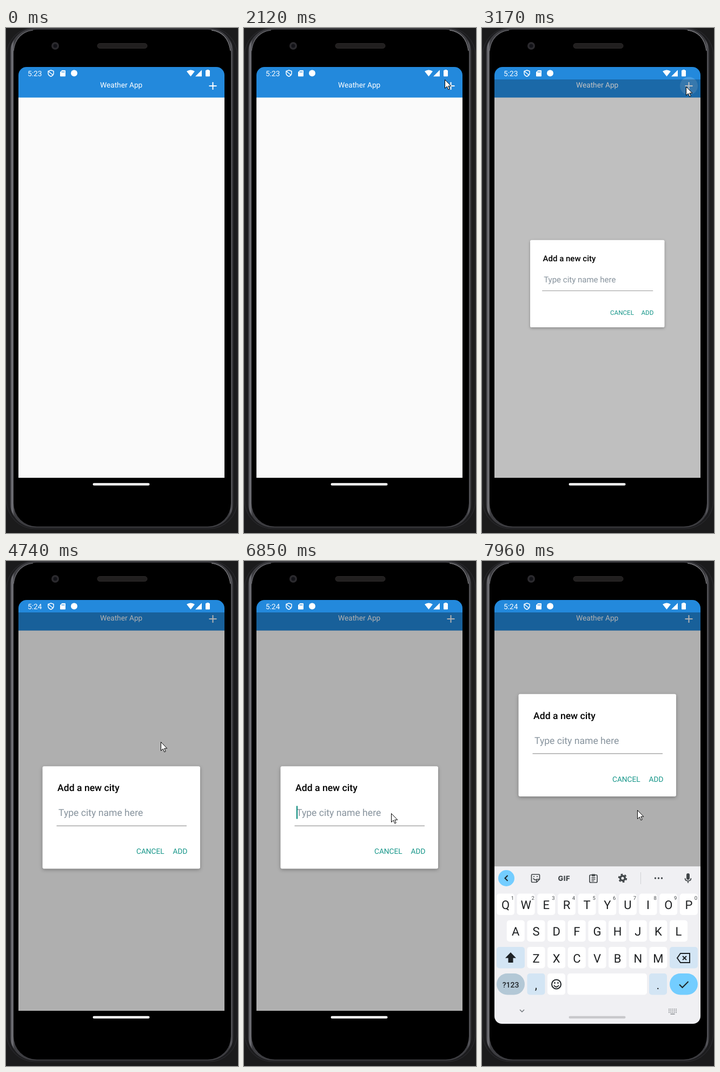
An HTML page that plays this animation: 429x933 px, repeating every 8 s.

```html
<!DOCTYPE html>
<html lang="en">
<head>
<meta charset="utf-8">
<title>Weather App</title>
<style>
  html, body { margin: 0; width: 100%; height: 100%; overflow: hidden; background: #1b1b1c; }
  svg { display: block; width: 429px; height: 933px; font-family: Roboto, sans-serif; text-rendering: geometricPrecision; }
  .card { fill: #fff; filter: drop-shadow(0 2px 3px rgba(0, 0, 0, .3)); }
  .line { fill: none; stroke: #1d2226; stroke-width: 2; }
  .key { font-size: 22px; fill: #1d1f21; text-anchor: middle; }
  .hint { font-size: 9.5px; fill: #45494d; text-anchor: middle; }
</style>
</head>
<body>
<svg viewBox="0 0 429 933">
  <defs>
    <linearGradient id="rim" x2="1" y2="0">
      <stop offset="0" stop-color="#2c2c30"/><stop offset=".009" stop-color="#77777d"/>
      <stop offset=".02" stop-color="#3c3c40"/><stop offset=".98" stop-color="#3c3c40"/>
      <stop offset=".99" stop-color="#58585d"/><stop offset="1" stop-color="#2a2a2d"/>
    </linearGradient>
    <clipPath id="glass"><rect x="23" y="72" width="381" height="783" rx="14"/></clipPath>
  </defs>

  <!-- phone body -->
  <rect width="429" height="933" fill="#1b1b1c"/>
  <rect x="1" y="-1" width="427" height="926" rx="52" fill="#1c1c1e" stroke="#2e2e32"/>
  <rect x="7.500" y="0" width="413" height="923" rx="46" fill="url(#rim)"/>
  <rect x="14" y="3" width="402" height="918" rx="43" fill="#000"/>
  <path d="M380 4Q410 8 415 42" fill="none" stroke="#a4a4a8"/>
  <path d="M14 42Q18 8 50 4" fill="none" stroke="#77777c"/>
  <circle cx="91" cy="33" r="7" fill="#2b2a2e"/><circle cx="91" cy="33" r="3.500" fill="#121217"/>
  <rect x="169" y="28.500" width="92" height="9" rx="4.500" fill="#211f1f" stroke="#2d2a2a"/>

  <!-- app -->
  <rect x="23" y="110" width="381" height="721" fill="#fafafa"/>
  <path d="M23 128.500V87A15 15 0 0 1 38 72H389A15 15 0 0 1 404 87V128.500Z" fill="#2389dc"/>
  <g fill="#fff">
    <text id="clock" x="40" y="88.500" font-size="13.700"></text>
    <path d="M83 78L88 79.800V83.500Q88 87.500 83 89.500Q78 87.500 78 83.500V79.800ZM79 80.500L87 87" fill="none" stroke="#fff" stroke-width="1.500"/>
    <path d="M103.500 78H109Q110 78 110 79V88.500Q110 89.500 109 89.500H101Q100 89.500 100 88.500V81.500Z"/>
    <path d="M103.500 80V82.500M105.500 80V82.500M107.500 80V82.500" stroke="#2389dc"/>
    <circle cx="126" cy="83.500" r="6"/>
    <path d="M334 80Q341.500 75 349 80L341.500 89.500ZM350 89.500L362 77.500V89.500Z"/>
    <path d="M371 78V77H375V78H376Q377 78 377 79V88.500Q377 89.500 376 89.500H370Q369 89.500 369 88.500V79Q369 78 370 78Z"/>
    <text x="174" y="109.500" font-size="13.700">Weather App</text>
    <circle id="ripple" cx="382.500" cy="107" r="16.500"/>
    <path d="M375.500 107H389.500M382.500 100V114" stroke="#fff" stroke-width="2"/>
  </g>
  <rect id="dim" x="23" y="95" width="381"/>

  <g id="dialog">
    <rect class="card" x="67.500" y="379.200" width="291.500" height="189.300" rx="3"/>
    <text x="95" y="425" font-size="17.600" font-weight="500">Add a new city</text>
    <text x="97" y="471.300" font-size="17.600" fill="#87939d">Type city name here</text>
    <path d="M93.500 489.300H334" stroke="#999" stroke-width="1.200"/>
    <rect id="caret" x="97" y="452.500" width="2" height="24" fill="#008577"/>
    <g font-size="13.700" fill="#169689">
      <text x="241" y="541.200">CANCEL</text><text x="308.500" y="541.200">ADD</text>
    </g>
  </g>

  <g clip-path="url(#glass)">
    <g id="keyboard">
      <rect x="23" y="564.500" width="381" height="291" fill="#f0f0f3"/>
      <g id="keys"></g>
      <circle cx="45" cy="586" r="15" fill="#73cdff"/>
      <path class="line" d="M47.500 581L42.500 586L47.500 591"/>
      <!-- toolbar icons -->
      <g class="line" style="stroke:#414649;stroke-width:1.700">
        <path d="M93 579H105Q106.500 579 106.500 580.500V588L101 593.500H93Q91.500 593.500 91.500 592V580.500Q91.500 579 93 579ZM101 593V588H106M95 586Q96.500 590 100 589M96 582V584M102 582V584"/>
        <path d="M201 580H211Q213 580 213 582V592Q213 594 211 594H201Q199 594 199 592V582Q199 580 201 580ZM202.500 585H209.500M202.500 588H209.500M202.500 591H207.500"/>
        <path d="M203 580.500H209" stroke-width="4"/>
        <circle cx="260" cy="586" r="4.300" stroke-width="3.500"/>
        <circle cx="260" cy="586" r="7" stroke-width="2.500" stroke-dasharray="3.665"/>
        <path d="M375.500 586Q375.500 591 381 591T386.500 586M381 591V595"/>
      </g>
      <text x="140.500" y="591" font-family="Inter, sans-serif" font-size="13" font-weight="800" letter-spacing=".5" fill="#414649">GIF</text>
      <path d="M293.500 575V597" stroke="#cfd1d4"/>
      <g fill="#414649">
        <circle cx="320.500" cy="586" r="1.700"/><circle cx="326.500" cy="586" r="1.700"/><circle cx="332.500" cy="586" r="1.700"/>
        <rect x="378" y="577" width="6" height="12" rx="3"/>
      </g>
      <!-- key icons -->
      <path d="M53 723L63 733.500H57.500V742H48.500V733.500H43Z" fill="#1d2226"/>
      <path class="line" d="M367 725H384V742H367L361 733.500ZM371 730L378 737M378 730L371 737" stroke-width="1.800"/>
      <g class="line"><circle cx="137.500" cy="782" r="8.500"/><path d="M133 784Q137.500 790 142 784M134.500 778V781M140.500 778V781"/></g>
      <path class="line" d="M365 782.500L370.500 788L381.500 777"/>
      <path class="line" d="M70 829L74 833L78 829" style="stroke:#70757a;stroke-width:1.500"/>
      <path d="M345 828H360M345 831H360M345 834H360" stroke="#85898d" stroke-width="1.700" stroke-dasharray="1.800 1.500"/>
      <path d="M348.500 837H356.500" stroke="#85898d" stroke-width="1.500"/>
    </g>
  </g>
  <rect id="handle" x="160.500" y="840.700" width="105" height="4.600" rx="2.300"/>
  <path id="pointer" d="M.5.5V16.500L4.300 13L6.800 18.800L9.200 17.800L6.800 12.200H11.800Z" fill="#fff" stroke="#000"/>
</svg>
<script>
const LOOP = 8000;
const KEYBOARD_START = 7063;
const $ = id => document.getElementById(id);
const parts = Object.fromEntries(['clock', 'ripple', 'dim', 'dialog', 'caret', 'keyboard', 'handle', 'pointer'].map(id => [id, $(id)]));

// time, x, y of the pointer tip
const pointerPath = [
  [60, 396, 926], [400, 360, 760], [800, 326, 602], [900, 326, 602],
  [1150, 319, 460], [1450, 353, 260], [1700, 343, 135], [1720, 343, 135],
  [2120, 371, 95], [2450, 377, 108], [4280, 377, 109], [4500, 338, 200],
  [4740, 286, 333], [4870, 253, 410], [5000, 285, 450], [5100, 285, 450],
  [5550, 324, 475], [5900, 286, 466], [6020, 282, 464], [6400, 279, 467],
  [6850, 272, 466], [7190, 272, 466], [7500, 287, 460], [8000, 287, 460]
];

const clamp = v => Math.max(0, Math.min(1, v));
const progress = (t, start, length) => clamp((t - start) / length);
const easeInOut = p => p < .5 ? 2 * p * p : 1 - 2 * (1 - p) ** 2;

function buildKeys() {
  const pitch = 37.65;
  const cap = (x, y, width, fill = '#fff', radius = 5) =>
    `<rect x="${x}" y="${y}" width="${width}" height="39.500" rx="${radius}" fill="${fill}"/>`;
  const label = (text, x, y, kind = 'key') => `<text class="${kind}" x="${x}" y="${y}">${text}</text>`;
  const blue = '#d3e5f4';
  let out = '';
  [['QWERTYUIOP', 43.5], ['ASDFGHJKL', 62.3], ['ZXCVBNM', 100]].forEach(([letters, left], row) => {
    const top = 614.5 + row * 49.2;
    [...letters].forEach((letter, i) => {
      const x = left + i * pitch;
      out += cap(x - 16.5, top, 33) + label(letter, x, top + 28.7);
      if (row === 0) out += label((i + 1) % 10, x + 13, top + 11.8, 'hint');
    });
  });
  out += cap(27, 713, 52, blue) + cap(347, 713, 52, blue);
  out += cap(27, 762, 52, '#b3c8d6', 19.7) + cap(347, 762, 52, '#73cdff', 19.7);
  out += cap(83.5, 762, 33, blue) + cap(121, 762, 33) + cap(158, 762, 147) + cap(309, 762, 33, blue);
  out += `<text x="53" y="787.500" font-size="14" font-weight="500" fill="#1d2226" text-anchor="middle">?123</text>`;
  out += label(',', 100, 791) + label('.', 325.5, 791);
  $('keys').innerHTML = out;
}

function pointerAt(t) {
  const next = Math.max(1, pointerPath.findIndex(point => point[0] >= t));
  const [t0, x0, y0] = pointerPath[next - 1], [t1, x1, y1] = pointerPath[next];
  const p = progress(t, t0, t1 - t0);
  return [x0 + (x1 - x0) * p, y0 + (y1 - y0) * p].map(Math.round);
}

function draw(t) {
  const open = easeInOut(progress(t, 2965, 305));
  const resized = t >= KEYBOARD_START;
  const slide = 1 - (1 - progress(t, KEYBOARD_START, 400)) ** 3;
  const scale = .3 + .7 * open;

  parts.clock.textContent = t < 3500 ? '5:23' : '5:24';
  parts.ripple.setAttribute('opacity', .17 * progress(t, 2560, 150) * (1 - progress(t, 3250, 400)));
  parts.dim.setAttribute('opacity', .3 * open);
  parts.dim.setAttribute('height', resized ? 469.5 : 736);
  parts.dialog.setAttribute('opacity', clamp(open * 2));
  parts.dialog.setAttribute('transform',
    `translate(213.500 ${resized ? 330 : 463.5}) scale(${scale}) translate(-213.500 -463.500)`);
  parts.caret.setAttribute('opacity', +(t >= 6500 && t < 7960));
  parts.keyboard.setAttribute('opacity', slide);
  parts.keyboard.setAttribute('transform', `translate(0 ${290 * (1 - slide)})`);
  parts.handle.setAttribute('fill', t < 7800 ? '#fff' : '#c8c8cb');
  parts.pointer.setAttribute('opacity', +(t >= 60));
  parts.pointer.setAttribute('transform', `translate(${pointerAt(t)})`);
}

buildKeys();
const begin = performance.now();
function tick() {
  draw((performance.now() - begin) % LOOP);
  requestAnimationFrame(tick);
}
tick();
</script>
</body>
</html>
```
